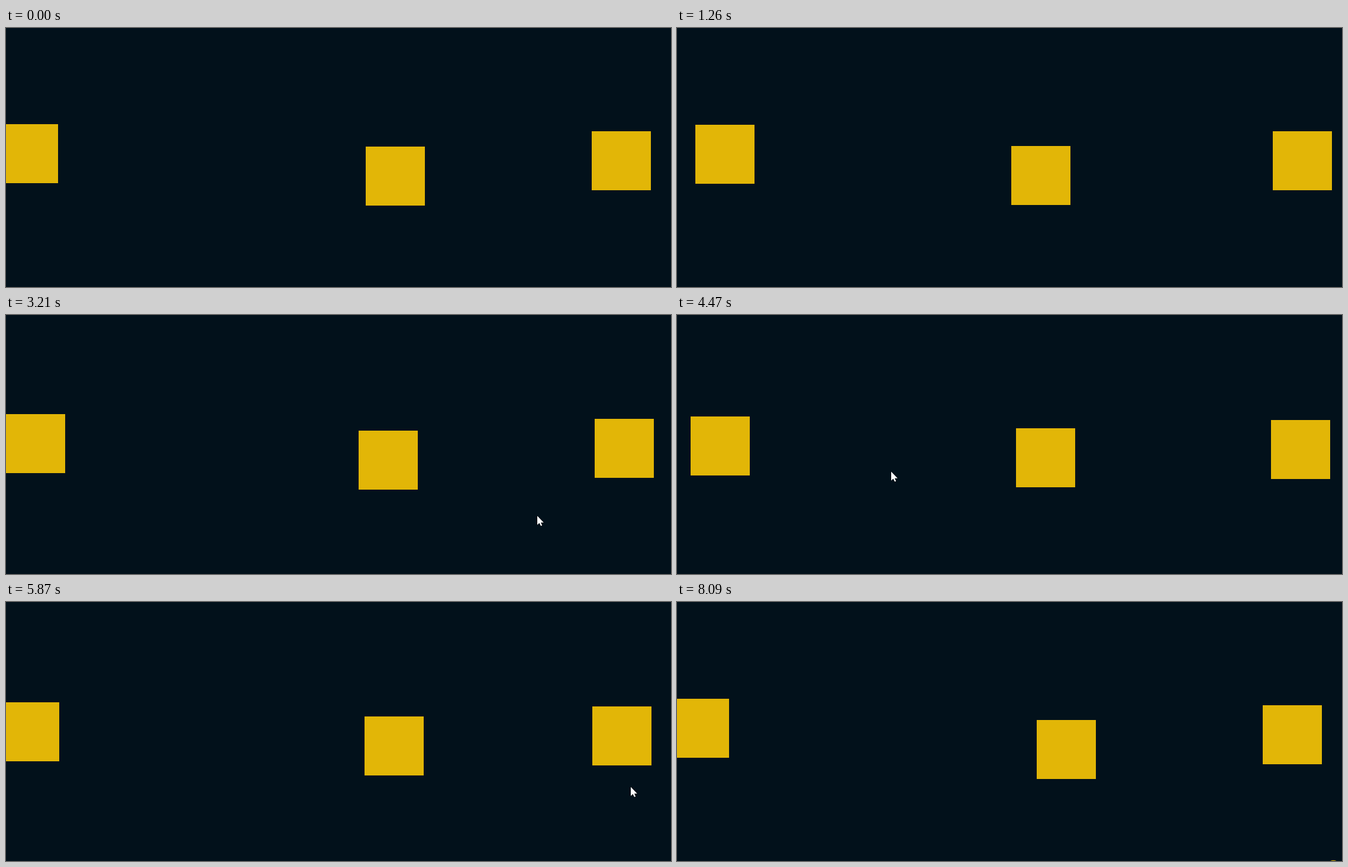
Animation of 1124x439 px, one loop 8.16 s. Source, as an HTML page:

```html
<!DOCTYPE html>
<html lang="en">
<head>
<meta charset="utf-8">
<title>Mouse parallax</title>
<style>
  html, body { margin: 0; width: 100%; height: 100%; overflow: hidden; background: #02111b; }
  svg { display: block; width: 1124px; height: 439px; }
</style>
</head>
<body>
<svg viewBox="0 0 1124 439">
  <rect width="1124" height="439" fill="#02111b"/>
  <g id="boxes" fill="#e2b607">
    <rect width="100" height="100"/>
    <rect width="100" height="100"/>
    <rect width="100" height="100"/>
  </g>
  <circle id="spot" cx="1109.5" cy="448.2" r="10.5" fill="#c9a208"/>
  <path id="cursor" d="M0 -.5V14.8L3.5 11.5L6 16.6L8.2 15.7L6 10.8H10.8Z"
        fill="#fff" stroke="#000" stroke-width=".8" paint-order="stroke"/>
</svg>
<script>
const LOOP = 8160, STEP = 70, START = 200, LAG = 70;

// The pointer circles the stage; each axis swings between turning points [time, position]
const turnsX = [
  [130, 1105], [1190, 27], [1400, 27], [1980, 880], [2600, 35], [3385, 1013],
  [4164, 19], [4950, 1060], [5300, 890], [5835, 1058], [6790, 444], [7060, 200], [7610, 1105]
];
const turnsY = [
  [130, 472], [600, 37], [1000, 452], [1400, 452], [2230, 72], [3130, 352],
  [3700, 127], [4020, 66], [4490, 267], [5150, 53], [5850, 314], [6770, 79], [7400, 455]
];

// Resting place and parallax factor of each square
const layers = [
  { x: 32.2, y: 182.2, k: -0.04 },
  { x: 563.8, y: 181.7, k: 0.04 },
  { x: 1007.6, y: 182.1, k: -0.016 }
];

const boxes = document.querySelectorAll('#boxes rect');
const cursor = document.getElementById('cursor');
const spot = document.getElementById('spot');

// Cosine easing from one turning point to the next
function swing(turns, t) {
  const next = turns.findIndex(p => p[0] > t);
  if (next < 0) return turns[turns.length - 1][1];
  if (next === 0) return turns[0][1];
  const [t0, a] = turns[next - 1], [t1, b] = turns[next];
  return a + (b - a) * (1 - Math.cos(Math.PI * (t - t0) / (t1 - t0))) / 2;
}

const pointer = t => [swing(turnsX, t), swing(turnsY, t)];

function place(el, x, y) {
  el.setAttribute('transform', `translate(${Math.round(x)} ${Math.round(y)})`);
}

function draw(time) {
  const t = time < START ? 0 : START + Math.floor((time - START) / STEP) * STEP;
  const [mx, my] = pointer(t - LAG);
  layers.forEach((l, i) => place(boxes[i], l.x + l.k * mx, l.y + l.k * my));
  place(cursor, ...pointer(t));
  spot.style.display = time >= 8090 ? '' : 'none';
}

const begin = performance.now();
function tick() {
  draw((performance.now() - begin) % LOOP);
  requestAnimationFrame(tick);
}
tick();
</script>
</body>
</html>
```
